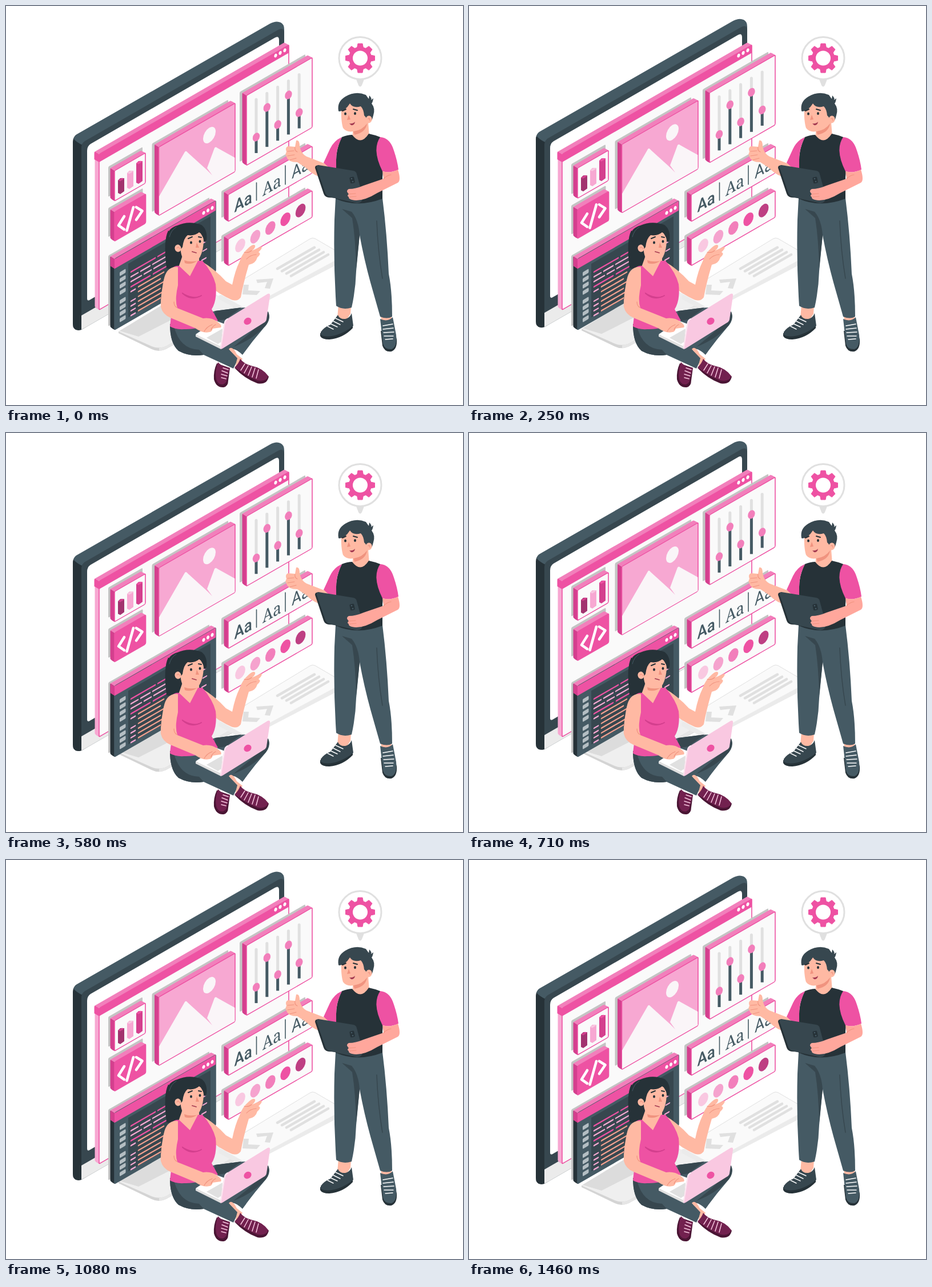
An HTML page that plays this animation: 800 px wide and 700 px high, repeating every 1500 ms.

```html
<!DOCTYPE html>
<html lang="en">
<head>
<meta charset="utf-8">
<title>Interface design</title>
<style>
html, body { margin: 0; width: 100%; height: 100%; overflow: hidden; background: #fff; }
svg { display: block; width: 100vw; height: 100vh; }
</style>
</head>
<body>
<svg id="stage" viewBox="0 0 800 700" xmlns="http://www.w3.org/2000/svg"></svg>
<script>
const PINK = '#ee52a3', MID = '#f27fbb', SOFT = '#f7a8d2', PALE = '#f9c8e1', DEEP = '#d43f8e', WINE = '#a2336f';
const INK = '#263238', SLATE = '#37474f', STEEL = '#455a64', SKIN = '#ffb9a3', ROSY = '#ffa79c', BLUSH = '#f0937f';
const WHITE = '#fafafa', GREY = '#e0e0e0', SHADE = '#c4c4c4';
const TAN = Math.tan(Math.PI / 6);

const path = (d, fill) => `<path d="${d}" fill="${fill}"/>`;
const line = (d, color, w = 1.5) =>
  `<path d="${d}" fill="none" stroke="${color}" stroke-width="${w}" stroke-linecap="round" stroke-linejoin="round"/>`;
const rect = (x, y, w, h, fill, more = '') => `<rect x="${x}" y="${y}" width="${w}" height="${h}" fill="${fill}" ${more}/>`;
const oval = (x, y, rx, ry, fill, turn = 0) =>
  `<ellipse rx="${rx}" ry="${ry}" fill="${fill}" transform="translate(${x} ${y}) rotate(${turn})"/>`;
const iso = (x, y, body) => `<g transform="translate(${x} ${y}) skewY(-30)">${body}</g>`;
const group = (id, body) => `<g id="${id}">${body}</g>`;

// Thick panel standing on the 30 degree axis; x, y is the front's upper left corner.
function slab(x, y, w, h, o = {}) {
  const d = 7.5, k = 4.4, end = y - w * TAN;
  const { fill = WHITE, side = DEEP, top = MID, edge = PINK, sx = -12, sy = -6, grow = 0 } = o;
  const cast = o.flat ? '' : iso(x + sx, y + sy, rect(0, 0, w + grow, h, SHADE, 'rx="2"'));
  return cast +
    path(`M${x} ${y}L${x - d + 1} ${y - k}Q${x - d} ${y - k} ${x - d} ${y - k + 2}V${y + h - k - 2}Q${x - d} ${y + h - k + 1} ${x} ${y + h}Z`, side) +
    path(`M${x} ${y}L${x - d} ${y - k}L${x + w - d - 1} ${end - k + .6}Q${x + w - d} ${end - k} ${x + w} ${end}Z`, top) +
    iso(x, y, rect(0, 0, w, h, fill, `rx="2" stroke="${edge}" stroke-width="1.6"`));
}

function monitor() {
  return path('M117 238Q117 230 124 226L140 240V563L132 568Q122 571 118 564Q117 562 117 558Z', INK) +
    path('M118 233Q120 227 124 225L462 31Q473 25 481 29Q487 32 487 41V60L134 244Q125 240 118 233Z', STEEL) +
    path('M132 248Q132 241 138 237L476 42Q487 36 487 48V363L132 568Z', SLATE) +
    path('M132 543L487 338V363L132 568Z', '#ebebeb') +
    path('M142 254Q142 246 148 242L470 56Q478 51 478 60V322L146 516Q142 518 142 513Z', '#fff');
}

function base() {
  return path('M197 571L335 488L402 526V534L280 602Q267 608 255 602L197 574Z', '#d4d4d4') +
    path('M197 571L335 488L402 526L280 597Q267 602 255 597Z', '#efefef') +
    path('M199 570L300 508L330 530L232 580Z', '#dcdcdc') +
    path('M280 597L402 526V533L280 602Q274 605 268 605V600Z', '#e6e6e6');
}

function browser() {
  const dots = [472, 480, 488].map((x, i) => oval(x, 87 - i * 4.6, 2.4, 3.5, '#fff', 20)).join('');
  return slab(163, 260, 332, 273, { flat: true, side: SOFT }) +
    path('M163 260L155.5 255.6Q154.5 256 154.5 259V269L163 274Z', PINK) +
    iso(163, 260, rect(0, 0, 332, 14, PINK)) + dots;
}

function mixer() {
  const knob = [230, 178, 208, 156, 187];
  return slab(421, 157, 115, 122.5) + knob.map((y, i) => {
    const x = 438 + i * 18.8, s = i * 10.85;
    return line(`M${x} ${164 - s}V${y}`, GREY, 5) +
      `<path d="M${x} ${y}V${258 - s}" stroke="${STEEL}" stroke-width="5"/>` +
      oval(x, y, 5.8, 8, MID, 25);
  }).join('');
}

function picture() {
  return slab(267.5, 247.5, 133.5, 120, { fill: SOFT }) +
    path('M268 334L313 256Q315 253 318 257L351 287L365 249Q367 246 370 249L400.5 266V290L268 366.5Z', '#faf5f8') +
    path('M351 287L349 280L361 297Z', SOFT) +
    iso(356, 226.5, oval(0, 0, 11, 13, '#faf5f8'));
}

function chart() {
  const bar = (x, y, h, c, lid) => path(`M${x} ${y}L${x + 4} ${y - 4}L${x + 11} ${y - 4}V${y + h - 5}L${x + 4} ${y + h}L${x} ${y + h - 2}Z`, c) +
    path(`M${x} ${y}L${x + 7} ${y - 4.5}L${x + 11} ${y - 3}L${x + 4} ${y + 1.5}Z`, lid);
  return slab(190, 289, 54, 53, { sx: -11, sy: -7, grow: 6 }) +
    bar(196, 306, 24, WINE, DEEP) + bar(212, 293, 28, SOFT, PALE) + bar(228, 276, 36, DEEP, PINK);
}

function code() {
  return slab(190, 361.5, 54.5, 51, { fill: PINK, sx: -11, sy: -7, grow: 6 }) +
    line('M207 369L197 385L207 392M223 353L211.5 394M228 353L238.5 359.5L228 375', '#fff', 4.6);
}

function typeCard() {
  const word = (x, y, font) => `<text transform="matrix(.866 -.5 0 1 ${x} ${y})" fill="${STEEL}" style="font:${font}">Aa</text>`;
  return slab(389, 331, 147, 47) +
    word(399.5, 362.5, '500 30px Roboto, sans-serif') +
    word(449, 334, "500 30px 'Noto Serif', serif") +
    word(500, 303.5, '400 30px Roboto, sans-serif') +
    line('M438.5 310V341M489 280V313', STEEL, 1.6);
}

function palette() {
  const tones = [PALE, '#f5a3ce', MID, PINK, '#be3f83'];
  return slab(389, 409, 147, 46.5) +
    tones.map((c, i) => iso(410 + i * 26.4, 420 - i * 15.3, oval(0, 0, 8.8, 10.8, c))).join('');
}

function terminal() {
  let out = slab(190, 444, 177, 124, { fill: STEEL, side: INK, edge: STEEL, sx: -11 }) +
    path('M190 444L182.5 439.6V456L190 461Z', DEEP) +
    iso(190, 444, rect(0, 0, 177, 17, PINK) + rect(24, 22, 144, 94, SLATE));
  out += [346, 353.5, 361].map((x, i) => oval(x, 363 - i * 4.4, 2.3, 3.4, '#fff', 20)).join('');
  out += [467, 478, 489, 500, 516, 527, 537, 548].map(y => iso(199, y, rect(0, 0, 10.5, 7, '#b4bec3', 'rx="1.5"'))).join('');
  const row = (y, color, ...runs) => iso(218, y, runs.map(([a, b]) => line(`M${a} 0H${b}`, color, 2.6)).join(''));
  out += row(467, PINK, [1, 43], [48, 76]) +
    row(475.5, SOFT, [1, 13], [18, 34], [39, 62]) +
    row(484, SOFT, [1, 19], [24, 36], [41, 62]) +
    row(493, PINK, [1, 34], [40, 62]);
  for (let i = 0; i < 6; i++) {
    const y = 500.5 + i * 8.4;
    out += (i === 1 ? '' : row(y + 1, SOFT, [1, 8])) + row(y, '#f2a08f', [14, i % 2 ? 52 : 58]);
  }
  return out + iso(343, 417, line('M0 0H6M2 14H8M0 29H7', SOFT, 2.4));
}

function keyboard() {
  const bars = [0, 1, 2, 3].map(i => line(`M${475 + i * 8} ${461 + i * 4.2}l65 -37.5`, GREY, 4.5)).join('');
  return path('M372 508V514L418 538L577 455V445Z', '#ebebeb') +
    path('M374 505L533 408Q537 406 541 408L577 429V446L420 531Z', WHITE) +
    line('M374 505L533 408Q537 406 541 408L577 429', GREY, 1) + bars +
    path('M416 489L425 489L424 499L445 500L439 507L414 506ZM438 480L468 478L462 496L453 495L457 484L440 486Z', GREY);
}

function bubble() {
  const teeth = Array.from({ length: 8 }, (_, i) =>
    `<path d="M-5.5 -18L-4 -25.5H4L5.5 -18Z" fill="${PINK}" transform="rotate(${i * 45})"/>`).join('');
  return path('M612 126L628 126L623 139Q620 144 617 139Z', GREY) +
    `<circle cx="620" cy="91.5" r="37" fill="#fff" stroke="${GREY}" stroke-width="3"/>` +
    `<g transform="translate(620 91.5)" stroke="${PINK}" stroke-width="1" stroke-linejoin="round">${teeth}<circle r="16.5" fill="none" stroke-width="7"/></g>`;
}

function man() {
  return [
    // legs and shoes
    path('M582 524L580 548L594 554L603 540L604 526ZM656 542L658 560L675 556V542Z', SKIN),
    path('M577 337L575 375Q573 450 578 526Q590 534 605 529Q612 498 613 465L619 402Q627 445 638 485L655 545Q667 550 676 545Q676 500 670 470Q667 400 659 337Z', STEEL),
    path('M588 356L605 361Q617 375 619 402L613 460Q612 410 606 372Z', SLATE),
    line('M649 377Q651 430 659 478', SLATE),
    path('M550 574V579Q553 585 566 585Q590 583 607 565V556L580 572Z', INK),
    path('M551 572Q556 564 568 559L581 542Q584 550 594 549Q602 547 605 539L608 561Q596 571 582 576Q562 583 551 577Z', SLATE),
    line('M569 558L580 563M573 553L585 559M577 548L590 554M563 562L573 567', '#fff'),
    path('M656 570L659 596Q663 608 675 606Q685 602 684 585L680 570Z', INK),
    path('M655 549Q668 555 677 546L683 577Q685 598 675 602Q663 603 660 593Z', STEEL),
    line('M660 561L677 558M660 567L678 565M661 573L679 572M662 579L678 579M664 585L677 584', '#fff'),
    // head
    path('M608 212L606 232Q620 244 636 230L634 204Z', SKIN),
    path('M608 220Q624 218 632 206Q630 222 610 226Z', BLUSH),
    path('M587 176Q586 202 590 214Q596 222 608 220Q624 216 632 205L642 186Q630 165 600 168Z', SKIN),
    path('M582 184Q579 168 594 159Q612 148 630 156L635 163L636 157Q641 162 639 165L643 162Q642 169 640 171Q647 180 643 192Q640 206 633 205Q632 196 627 192Q626 181 621 176Q608 180 602 171Q594 184 583 185Z', SLATE),
    oval(635, 199, 5.5, 6.5, SKIN, 15), line('M634 198Q637 196 637 201', BLUSH, 1.2),
    line('M589 184L595 181M608 181L615 183', INK, 2),
    oval(594, 189, 2, 2.6, INK), oval(611, 188.5, 2, 2.6, INK),
    path('M600 191L597 200L603 199Z', BLUSH), path('M601 206Q607 207 611 203Q610 210 604 209Z', '#a53b52'),
    // torso
    path('M606 226Q598 226 588 230Q578 250 578 270L577 338Q615 355 659 338V300Q664 260 655 230Q645 226 635 224Q621 246 606 226Z', INK),
    path('M655 230Q670 231 677 248Q685 270 687 287Q672 294 659 290Q640 252 655 230Z', PINK),
    path('M588 230Q574 236 567 251L556 275Q562 284 578 290V270Q578 250 588 230Z', PINK),
    // thumbs-up arm
    path('M508 236Q514 234 514 246L516 253Q520 261 526 264L557 276Q566 284 572 288L556 301Q541 300 525 284L510 274Q493 274 491 264Q488 260 491 256Q488 248 494 246L506 247Z', SKIN),
    line('M493 255L504 254M493 263L505 261M497 270L508 267M506 248Q505 254 510 256', BLUSH, 1.1),
    // tablet
    path('M541 284Q541 279 547 280L606 290L620 339L565 336Q558 335 556 329Z', INK),
    path('M547 279L608 289Q613 290 614 295L624 332Q626 345 615 346L566 335Q561 333 559 328L544 284Q543 279 547 279Z', SLATE),
    rect(602, 300, 8, 11, INK, 'rx="2" transform="rotate(-12 606 305)"'),
    oval(605, 303, 1.3, 1.3, STEEL), oval(607, 308, 1.3, 1.3, STEEL),
    // holding arm
    path('M659 290Q674 294 686 287Q692 306 686 310L650 328Q629 341 613 341Q599 340 600 335Q596 333 600 330Q594 324 600 321Q612 321 626 315L661 303Z', ROSY),
    line('M600 330L612 329M602 335L613 334M661 303Q667 297 674 296', BLUSH, 1.2)
  ].join('');
}

function woman() {
  return [
    path('M284 394Q275 412 281 460Q294 464 307 453L309 408Z', INK),
    // pointing arm
    path('M341 447Q365 461 385 483L396 489Q401 464 409 448Q413 434 426 423Q433 417 436 420Q437 424 431 429L447 422Q450 424 442 432Q448 434 440 441Q437 452 425 454Q415 488 411 511Q404 521 390 513Q373 505 360 494Z', SKIN),
    line('M421 444Q427 437 438 436M417 432Q424 434 430 429', BLUSH, 1.1),
    // head
    path('M309 438L302 458L322 475L338 455V440Z', SKIN),
    path('M312 446Q322 450 335 447Q324 455 313 451Z', BLUSH),
    path('M306 410Q304 432 309 441Q320 450 335 447Q346 434 346 408L338 394H315Z', SKIN),
    path('M283 402Q284 390 300 385Q320 376 342 384Q353 392 351 410Q349 418 346 411Q345 400 338 397Q330 404 318 402Q311 407 309 423Q302 432 298 428Q286 420 283 402Z', INK),
    oval(301, 425, 5.5, 6.5, SKIN, -12), line('M299 425Q302 421 304 426', BLUSH, 1.2),
    line('M286 405Q289 393 298 388', STEEL, 1),
    line('M319 408L326 405M337 405L342 406', INK, 2),
    oval(324, 415, 2, 2.6, INK), oval(339.5, 413, 2, 2.6, INK),
    path('M334 415L338 424L332 424Z', BLUSH), line('M326 431L333 433', '#a53b52', 1.8),
    // legs
    path('M287 558Q287 592 302 605Q322 616 346 612L398 636L407 618L392 604Q398 597 414 612Q431 588 451 565Q464 552 460 539Q448 526 405 530L366 535Z', STEEL),
    path('M287 558Q287 592 302 605Q322 616 346 612L338 603Q304 602 294 562Z', SLATE),
    path('M366 535L412 529L384 550L366 553ZM452 540Q446 558 420 580L398 598Q430 586 452 563Q464 550 459 536Z', SLATE),
    path('M390 602Q396 595 404 611L414 619L403 634Q400 636 405 618Z', SKIN),
    // shoes
    path('M369 627Q363 640 364 655Q368 670 381 669Q389 667 389 657L392 635Z', '#4a1534'),
    path('M371 625Q365 642 368 655Q371 665 380 664Q387 661 387 652L392 635Q379 634 371 625Z', '#72214f'),
    line('M380 635L389 638M378 640L388 644M377 646L387 649M377 652L385 654', PALE),
    path('M400 635Q418 654 440 662Q457 665 460 650L446 640Z', '#4a1534'),
    path('M410 619Q407 628 400 634Q420 649 440 657Q456 660 459 649Q449 635 429 631Q417 628 410 619Z', '#72214f'),
    line('M418 628L411 639M424 631L417 644M430 633L424 648M436 635L431 651M442 638L438 653', PALE),
    // shirt
    path('M289 461Q296 455 303 456L322 474L336 447L344 447Q362 468 367 488Q370 516 360 532L371 552Q340 568 312 567Q296 568 287 562Q290 530 297 514Z', PINK),
    path('M307 502Q322 519 343 508Q328 515 307 502Z', DEEP), line('M309 504Q324 518 342 508', DEEP, 2),
    // laptop base, typing arm, lid
    path('M332 576L367 552L383 558L377 602Z', '#fff'), path('M332 576V580L376 602V597Z', GREY),
    path('M351 582L379 566L377 589L371 593Z', GREY),
    path('M301 458Q281 456 276 481Q270 512 271 528Q274 541 288 547L331 565Q345 575 356 572Q360 572 362 566L376 564Q379 560 370 554Q360 546 345 548L300 530Q295 515 301 490Z', SKIN),
    line('M347 571Q351 563 361 559M359 568Q361 562 367 559M299 529Q294 526 294 519', BLUSH, 1.2),
    path('M375 599L382 555Q383 551 387 549L458 505Q463 503 462 509L456 550Q455 554 451 556L379 601Q375 603 375 599Z', PALE),
    line('M376 599L383 555Q384 551 388 549', '#fde6f1', 2),
    oval(423, 553, 7, 5.8, PINK, -35)
  ].join('');
}

const stage = document.getElementById('stage');
stage.innerHTML = group('screen', monitor() + base()) + keyboard() + browser() +
  group('cards', mixer() + picture() + chart() + code()) +
  typeCard() + palette() + terminal() + bubble() + man() + woman();

const LOOP = 1500, STEPS = 36, LIFT = 13.5;
const floating = ['screen', 'cards'].map(id => document.getElementById(id));

// Even rise and fall, 24 steps a second.
function draw(ms) {
  const step = Math.floor((ms % LOOP + 4) * STEPS / LOOP) % STEPS;
  const phase = step / (STEPS - 1);
  const rise = LIFT * (1 - Math.abs(2 * phase - 1));
  floating.forEach(g => g.setAttribute('transform', `translate(0 ${-rise.toFixed(2)})`));
}

const start = performance.now();
function tick() {
  draw(performance.now() - start);
  requestAnimationFrame(tick);
}
tick();
</script>
</body>
</html>
```
